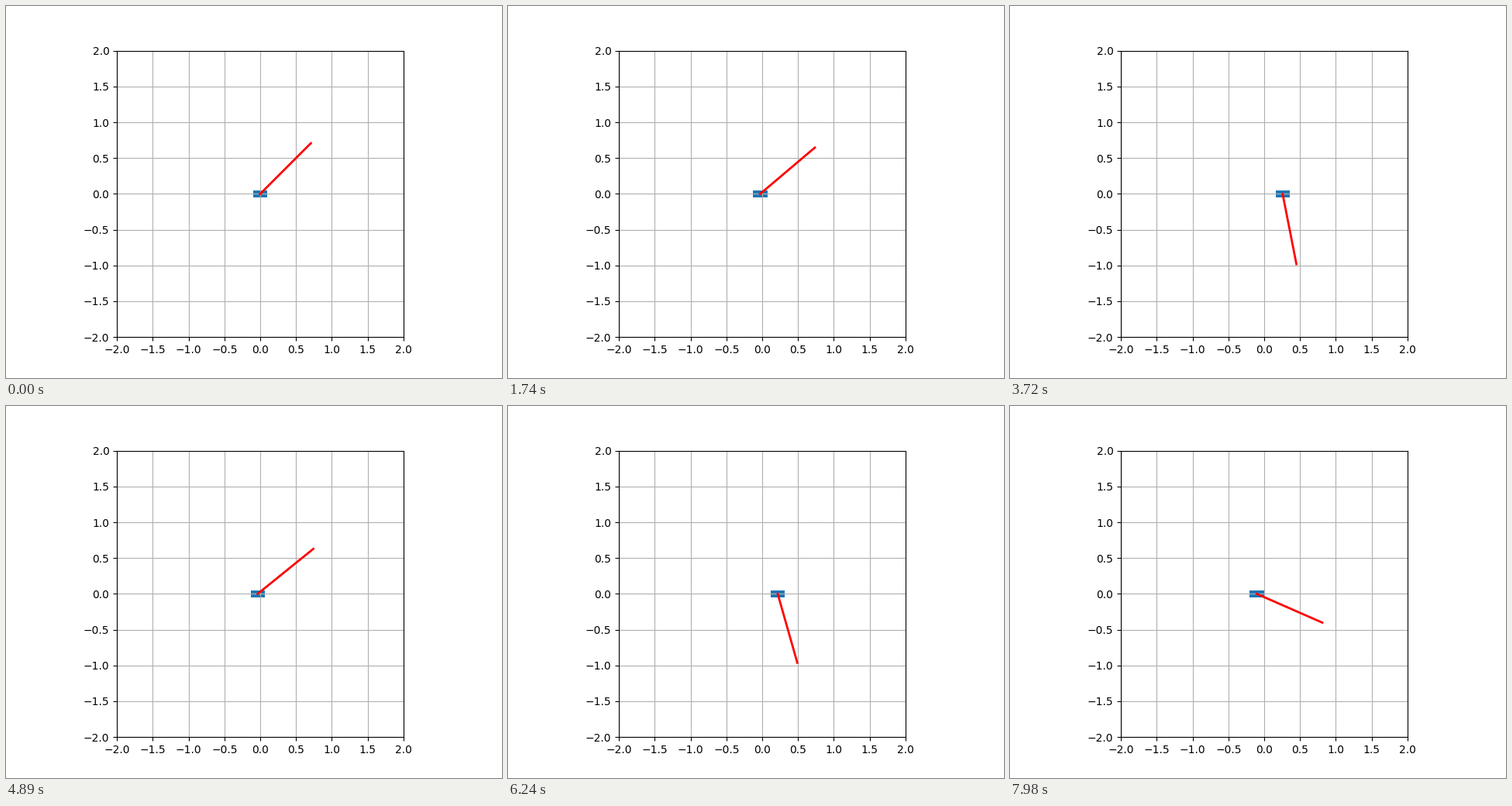
A matplotlib script for the animation above (8 s loop, 640x480 px).

```python
import numpy as np
import matplotlib.pyplot as plt
from matplotlib.animation import FuncAnimation
from matplotlib.patches import Rectangle

# Pendulum of unit length on a free cart of equal mass, angle from upright
G = 9.8
DAMPING = 5.5e-4
DT = 0.05
SUBSTEPS = 10
FRAMES = 267
LOOP_MS = 8000
CART_W, CART_H = 0.2, 0.1
START = np.pi / 4


def derivs(state):
    theta, omega = state
    s, c = np.sin(theta), np.cos(theta)
    accel = (G * s - 0.5 * s * c * omega**2) / (1 - 0.5 * c**2)
    return np.array([omega, accel - DAMPING * omega])


def rk4(state, h):
    k1 = derivs(state)
    k2 = derivs(state + h / 2 * k1)
    k3 = derivs(state + h / 2 * k2)
    k4 = derivs(state + h * k3)
    return state + h / 6 * (k1 + 2 * k2 + 2 * k3 + k4)


def simulate():
    state = np.array([START, 0.0])
    angles = []
    for _ in range(FRAMES):
        angles.append(state[0])
        for _ in range(SUBSTEPS):
            state = rk4(state, DT / SUBSTEPS)
    return np.array(angles)


theta = simulate()
# The shared centre of mass never moves sideways
cart_x = 0.5 * (np.sin(START) - np.sin(theta))
tip_x = cart_x + np.sin(theta)
tip_y = np.cos(theta)

fig, ax = plt.subplots(figsize=(6.4, 4.8), dpi=100)
ax.set_xlim(-2, 2)
ax.set_ylim(-2, 2)
ax.set_aspect("equal")
ax.grid()

cart = ax.add_patch(Rectangle((-CART_W / 2, -CART_H / 2), CART_W, CART_H))
rod, = ax.plot([], [], "r-", lw=2)


def update(i):
    cart.set_x(cart_x[i] - CART_W / 2)
    rod.set_data([cart_x[i], tip_x[i]], [0, tip_y[i]])
    return cart, rod


ani = FuncAnimation(fig, update, frames=FRAMES, interval=LOOP_MS / FRAMES,
                    init_func=lambda: update(0), repeat=True)
plt.show()
```
